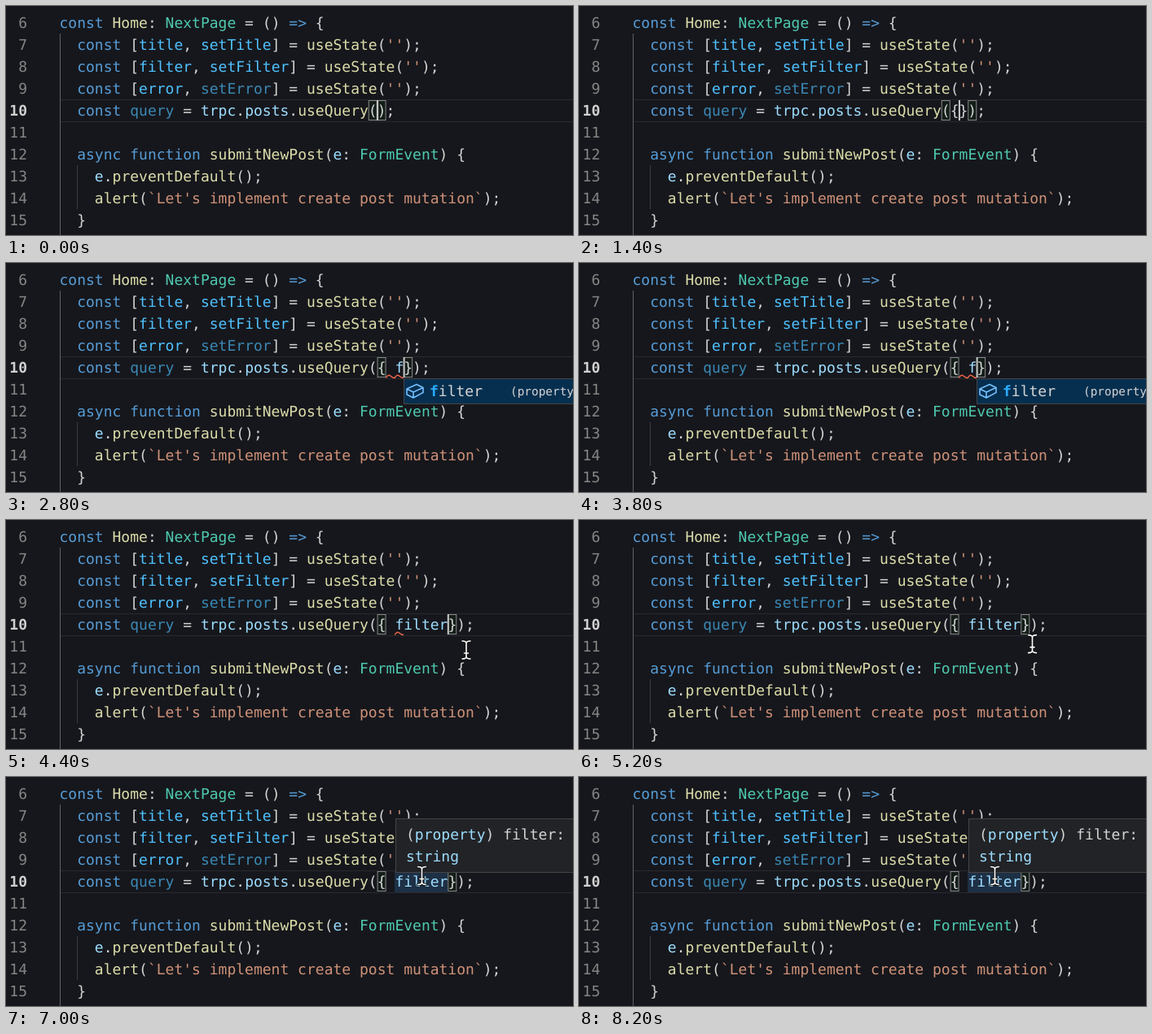
Write an HTML page that moves like this. It is 696 px wide and 282 px high and loops after 8400 ms.

```html
<!DOCTYPE html>
<html lang="en">
<head>
<meta charset="utf-8">
<title>Editor autocomplete</title>
<style>
html, body { margin: 0; width: 100%; height: 100%; overflow: hidden; background: #16171c; }
svg { display: block; }
text { font: 18px "DejaVu Sans Mono", monospace; fill: #d4d4d4; white-space: pre; text-rendering: geometricPrecision; }
.num { fill: #858585; text-anchor: end; }
.num.now { fill: #d0d0d0; font-weight: bold; }
.k { fill: #569cd6; }
.f { fill: #dcdcaa; }
.t { fill: #4ec9b0; }
.c { fill: #4fc1ff; }
.d { fill: #3b88b4; }
.s { fill: #ce9178; }
.v { fill: #9cdcfe; }
.m { fill: #2aaaff; font-weight: bold; }
.box { fill: #00640018; stroke: #888; }
.detail { font-size: 14.4px; }
</style>
</head>
<body>
<svg width="696" height="282" viewBox="0 0 696 282">
  <path d="M66 115.5H696M66 142.5H696" stroke="#292a2f"/>
  <path d="M66.5 34V282" stroke="#606166"/>
  <path d="M87.5 196V250" stroke="#3c3d42"/>
  <rect id="hover" x="477" y="116" width="65" height="26" fill="#264f78" opacity=".45"/>
  <g id="code"></g>
  <g id="edit"></g>
  <g id="popup">
    <rect x="488.5" y="142.5" width="220" height="31" fill="#062f4f" stroke="#454545"/>
    <path d="M492 155L504 149.500L512 153.500V159.500L500 166L492 162ZL500 159L512 153.500M500 159V166" fill="none" stroke="#75beff" stroke-width="1.600" stroke-linejoin="round"/>
  </g>
  <g id="tip">
    <rect x="478.500" y="51.500" width="230" height="66" fill="#222326" stroke="#454545"/>
  </g>
  <g id="mouse" fill="none" stroke-linecap="round">
    <path id="beam" d="M-5-11Q0-11 0-8Q0-11 5-11M0-8V8M-5 11Q0 11 0 8Q0 11 5 11M-2.500 4H2.500" stroke="#111" stroke-width="3.500"/>
    <use href="#beam"/>
  </g>
</svg>
<script>
const $ = id => document.getElementById(id);
const LOOP = 8400, STEP = 200, BLINK = 530;
const LEFT = 65.5, ADVANCE = 10.836, ROW = 27, BASE = 26.5;
const colX = col => LEFT + col * ADVANCE;

// ~k word~ marks a coloured token
const paint = s => s.replace(/~(\w) (.*?)~/g, '<tspan class="$1">$2</tspan>');
const label = (x, y, s, cls = '') => `<text x="${x}" y="${y}" class="${cls}">${paint(s)}</text>`;

const state = (name, setter) =>
  `  ~k const~ [~c ${name}~, ${setter}] = ~f useState~(~s ''~);`;
const lines = [
  '~k const~ ~f Home~: ~t NextPage~ = () ~k =&gt;~ {',
  state('title', '~c setTitle~'),
  state('filter', '~c setFilter~'),
  state('error', '~d setError~'),
  '',
  '',
  '  ~k async~ ~k function~ ~f submitNewPost~(~v e~: ~t FormEvent~) {',
  '    ~v e~.~f preventDefault~();',
  "    ~f alert~(~s `Let's implement create post mutation`~);",
  '  }'
];
$('code').innerHTML = lines.map((s, i) => {
  const y = BASE + i * ROW;
  return label(26, y, String(i + 6), i === 4 ? 'num now' : 'num') + label(LEFT, y, s);
}).join('');

$('popup').innerHTML += label(520, 163.5, '~m f~ilter') + label(619, 163, '(property', 'detail');
$('tip').innerHTML += label(491, 77, '(~v property~) filter:') + label(491, 104, '~v string~');
$('mouse').innerHTML = $('mouse').innerHTML.replace('<use href="#beam"></use>',
  `<path d="${$('beam').getAttribute('d')}" stroke="#fff" stroke-width="1.600"/>`);

// time, text inside the call, cursor column, columns of the matched brackets
const edits = [
  [0, '', 36, 35, 36],
  [1400, '{}', 37, 35, 38],
  [1600, '{}', 37, 36, 37],
  [2400, '{ }', 38, 36, 38],
  [2600, '{ ~v f~}', 39, 36, 39],
  [4200, '{ ~v filter~}', 44, 36, 44]
];

const squiggle = (from, to) => {
  let d = `M${colX(from)} 141.5`;
  for (let c = from; c < to; c++) d += 'q2.700-5 5.400-2.500t5.400 2.500';
  return `<path d="${d}" fill="none" stroke="#f0674c" stroke-width="1.500"/>`;
};
const box = col => `<rect class="box" x="${colX(col) + .5}" y="116.5" width="10" height="24"/>`;

function drawEdit(t) {
  const [start, inner, cursor, open, close] = edits.filter(e => e[0] <= t).pop();
  const caretOn = Math.floor((t - start) / BLINK) % 2 === 0;
  let out = box(open) + box(close);
  out += label(LEFT, BASE + 4 * ROW,
    `  ~k const~ ~d query~ = ~v trpc~.~v posts~.~f useQuery~(${inner});`);
  if (t >= 2600 && t < 4800) out += squiggle(t < 4200 ? 37 : 38, 39);
  if (caretOn) out += `<rect x="${colX(cursor) - .5}" y="116" width="2" height="25" fill="#c8c8c8"/>`;
  $('edit').innerHTML = out;
}

const show = (id, on) => $(id).setAttribute('visibility', on ? 'visible' : 'hidden');
const ease = (t, from, to) => {
  const p = Math.min(1, Math.max(0, (t - from) / (to - from)));
  return p * p * (3 - 2 * p);
};

let last = -1;
function frame(now) {
  const t = Math.floor(now % LOOP / STEP) * STEP;
  if (t !== last) {
    last = t;
    drawEdit(t);
    show('popup', t >= 2800 && t < 4200);
    show('mouse', t >= 4400);
    show('hover', t >= 6800);
    show('tip', t >= 6800);
    const move = ease(t, 5000, 5800);
    const x = 565 - 54.5 * move;
    const y = 160 - 47.5 * move + 9 * ease(t, 6000, 6400);
    $('mouse').setAttribute('transform', `translate(${x} ${y})`);
  }
  requestAnimationFrame(frame);
}
frame(0);
</script>
</body>
</html>
```
